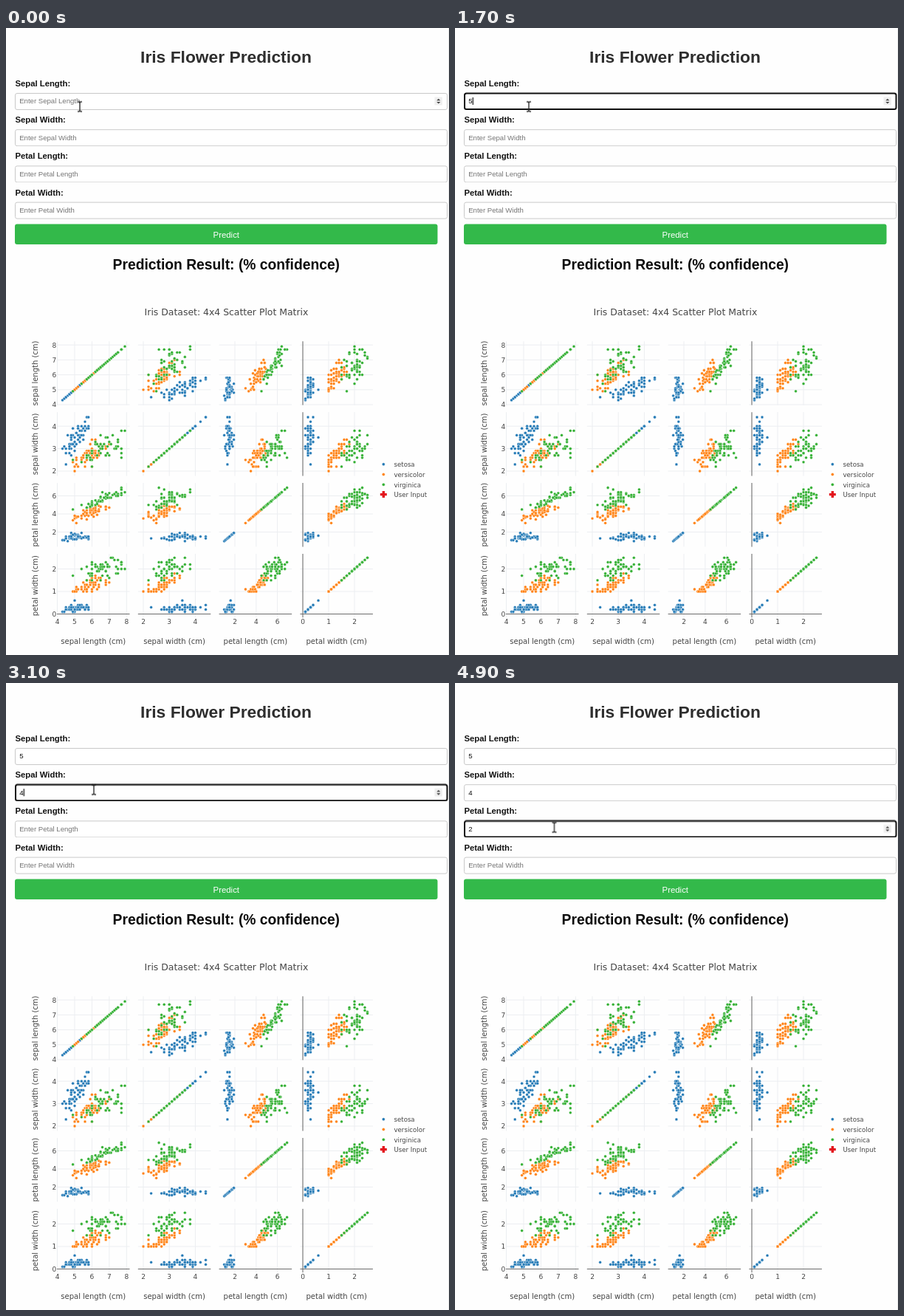
An HTML page that plays this animation: 600 by 849 pixels, repeating every 5000 ms.

```html
<!DOCTYPE html>
<html lang="en">
<head>
<meta charset="utf-8">
<title>Iris Flower Prediction</title>
<style>
html, body { margin: 0; width: 100%; height: 100%; overflow: hidden; background: #fefefe; }
svg { display: block; width: 600px; height: 849px; }
text { font-family: "Liberation Sans", Arial, sans-serif; }
.label, .head { font-weight: bold; }
.label { font-size: 11.3px; fill: #111; }
.hint { font-size: 9.6px; fill: #757575; }
.value { font-size: 9.6px; fill: #111; }
.plot text { font-family: "DejaVu Sans", Verdana, sans-serif; fill: #444; }
.tick { font-size: 9px; }
.axis { font-size: 10px; }
.legend { font-size: 8.6px; }
.mid { text-anchor: middle; }
.end { text-anchor: end; }
.grid { stroke: #eceef1; }
.zero { stroke: #6c6c6c; stroke-width: 1.1; }
.dot { stroke: #fff; stroke-width: .4; }

.anim { animation: 5s step-end infinite; }
.focus, .spin, .caret, .value { opacity: 0; }
.focus0 { animation-name: focus0; } .focus1 { animation-name: focus1; } .focus2 { animation-name: focus2; }
.spin0 { animation-name: spin0; } .spin1 { animation-name: spin1; } .spin2 { animation-name: spin2; }
.value0 { animation-name: value0; } .value1 { animation-name: value1; } .value2 { animation-name: value2; }
.hint0 { animation-name: hint0; } .hint1 { animation-name: hint1; } .hint2 { animation-name: hint2; }
.caret0 { animation-name: caret0; } .caret1 { animation-name: caret1; } .caret2 { animation-name: caret2; }
.mouse { animation-name: mouse; }

@keyframes focus0 { 0% { opacity: 0 } 10% { opacity: 1 } 52%, to { opacity: 0 } }
@keyframes focus1 { 0% { opacity: 0 } 52% { opacity: 1 } 76%, to { opacity: 0 } }
@keyframes focus2 { 0% { opacity: 0 } 76%, to { opacity: 1 } }
@keyframes spin0 { 0% { opacity: 1 } 52%, to { opacity: 0 } }
@keyframes spin1 { 0% { opacity: 0 } 42% { opacity: 1 } 76%, to { opacity: 0 } }
@keyframes spin2 { 0% { opacity: 0 } 70%, to { opacity: 1 } }
@keyframes value0 { 0% { opacity: 0 } 28%, to { opacity: 1 } }
@keyframes value1 { 0% { opacity: 0 } 60%, to { opacity: 1 } }
@keyframes value2 { 0% { opacity: 0 } 88%, to { opacity: 1 } }
@keyframes hint0 { 0% { opacity: 1 } 28%, to { opacity: 0 } }
@keyframes hint1 { 0% { opacity: 1 } 60%, to { opacity: 0 } }
@keyframes hint2 { 0% { opacity: 1 } 88%, to { opacity: 0 } }
@keyframes caret0 {
  0% { opacity: 0; transform: none } 10% { opacity: 1; transform: none } 20% { opacity: 0; transform: none }
  28% { opacity: 1; transform: translateX(5.5px) } 38% { opacity: 0; transform: translateX(5.5px) }
  48% { opacity: 1; transform: translateX(5.5px) } 52%, to { opacity: 0; transform: none }
}
@keyframes caret1 {
  0% { opacity: 0; transform: none } 52% { opacity: 1; transform: none }
  60% { opacity: 1; transform: translateX(5.5px) } 70%, to { opacity: 0; transform: none }
}
@keyframes caret2 {
  0% { opacity: 0; transform: none } 76% { opacity: 1; transform: none } 86% { opacity: 0; transform: none }
  88% { opacity: 1; transform: translateX(5.5px) } 98%, to { opacity: 0; transform: none }
}
@keyframes mouse {
  0% { transform: translate(100px, 106.5px) }
  38% { transform: translate(105px, 116px) }
  40% { transform: translate(112px, 129px) }
  42% { transform: translate(117px, 140px) }
  44% { transform: translate(119px, 144.5px) }
  66% { transform: translate(123px, 158px) }
  68% { transform: translate(129px, 177px) }
  70% { transform: translate(133px, 190px) }
  72%, to { transform: translate(134.5px, 195.5px) }
}
</style>
</head>
<body>
<svg viewBox="0 0 600 849">
  <path d="M599.5 0V849" stroke="#eee"/>
  <text class="head mid" x="298" y="47" font-size="22.8" fill="#2e2e2e">Iris Flower Prediction</text>
  <g id="form"></g>
  <rect x="12" y="265.5" width="572.5" height="27.5" rx="3" fill="#33b94a"/>
  <text class="mid" x="298.3" y="283.5" font-size="11.4" fill="#fff">Predict</text>
  <text class="head mid" x="298.3" y="327" font-size="19.3" fill="#0c0c0c">Prediction Result: (% confidence)</text>
  <g class="plot">
    <text class="mid" x="298.5" y="389" font-size="12.43">Iris Dataset: 4x4 Scatter Plot Matrix</text>
    <g id="plot"></g>
  </g>
  <g class="anim mouse" fill="none">
    <path d="M-3-6.5H-1L0-5.5L1-6.5H3M0-5.5V5.5M-3 6.5H-1L0 5.5L1 6.5H3" stroke="#222" stroke-width="1.3"/>
  </g>
</svg>
<script>
(() => {
  const NS = 'http://www.w3.org/2000/svg';
  const form = document.getElementById('form');
  const plot = document.getElementById('plot');

  function add(parent, tag, attrs, text) {
    const el = document.createElementNS(NS, tag);
    for (const k in attrs) el.setAttribute(k, attrs[k]);
    if (text !== undefined) el.textContent = text;
    parent.appendChild(el);
    return el;
  }

  // Form fields
  const values = ['5', '4', '2'];
  ['Sepal Length', 'Sepal Width', 'Petal Length', 'Petal Width'].forEach((name, i) => {
    const g = add(form, 'g', { transform: `translate(0 ${(i * 49.2).toFixed(1)})` });
    add(g, 'text', { class: 'label', x: 12.5, y: 79 }, name + ':');
    add(g, 'rect', { x: 12.5, y: 88.5, width: 585, height: 22, rx: 2.5, fill: '#fff', stroke: '#c9c9c9' });
    add(g, 'text', { class: `hint anim hint${i}`, x: 18.2, y: 102.4 }, 'Enter ' + name);
    if (i >= values.length) return;
    add(g, 'rect', { class: `focus anim focus${i}`, x: 13, y: 88.5, width: 584.5, height: 21.5, rx: 2.5,
      fill: 'none', stroke: '#101010', 'stroke-width': 2 });
    add(g, 'text', { class: `value anim value${i}`, x: 18.2, y: 102.4 }, values[i]);
    add(g, 'path', { class: `caret anim caret${i}`, d: 'M18.8 94V104', stroke: '#000', 'stroke-width': 1.2 });
    const spin = add(g, 'g', { class: `spin anim spin${i}` });
    add(spin, 'rect', { x: 580.5, y: 93.5, width: 10.5, height: 11, fill: '#efefef' });
    add(spin, 'path', { d: 'M583.2 98.3L585.8 95.8L588.4 98.3ZM583.2 100.1L585.8 102.6L588.4 100.1Z', fill: '#444' });
  });

  // Each axis maps a value in cm to pixels
  const axes = [
    { name: 'sepal length (cm)', ticks: [4, 5, 6, 7, 8], x: v => 69.5 + 23.45 * (v - 4), y: v => 510 - 20.2 * (v - 4) },
    { name: 'sepal width (cm)', ticks: [2, 3, 4], x: v => 186 + 35.2 * (v - 2), y: v => 600 - 30.4 * (v - 2) },
    { name: 'petal length (cm)', ticks: [2, 4, 6], x: v => 310 + 14.4 * (v - 2), y: v => 682.5 - 12.25 * (v - 2) },
    { name: 'petal width (cm)', ticks: [0, 1, 2], x: v => 402 + 35 * v, y: v => 793.5 - 30.5 * v }
  ];
  const colLeft = i => 69 + 109.8 * i;
  const rowTop = i => 424.3 + 95.9 * i;
  const W = 98.5, H = 86.3;

  // Mean, deviation and pairwise correlation of each species, plus its outlying flowers
  const species = [
    { name: 'setosa', color: '#1f77b4',
      mean: [5.006, 3.428, 1.462, .246], dev: [.352, .379, .174, .105],
      corr: [.743, .267, .278, .178, .233, .332],
      edge: [[5.7, 4.4, 1.5, .4], [4.3, 3, 1.1, .1], [4.5, 2.3, 1.3, .3], [5.8, 4, 1.2, .2],
        [5, 3.5, 1.6, .6], [4.8, 3.4, 1.9, .2], [4.6, 3.6, 1, .2]] },
    { name: 'versicolor', color: '#ff7f0e',
      mean: [5.936, 2.77, 4.26, 1.326], dev: [.516, .314, .47, .198],
      corr: [.526, .754, .546, .561, .664, .787],
      edge: [[5, 2, 3.5, 1], [4.9, 2.4, 3.3, 1], [7, 3.2, 4.7, 1.4], [5.1, 2.5, 3, 1.1],
        [6, 2.2, 4, 1], [5.9, 3.2, 4.8, 1.8], [6, 3.4, 4.5, 1.6], [6, 2.7, 5.1, 1.6]] },
    { name: 'virginica', color: '#2fae2f',
      mean: [6.588, 2.974, 5.552, 2.026], dev: [.636, .322, .552, .275],
      corr: [.457, .864, .281, .401, .538, .322],
      edge: [[7.9, 3.8, 6.4, 2], [7.7, 3.8, 6.7, 2.2], [4.9, 2.5, 4.5, 1.7], [7.7, 2.6, 6.9, 2.3],
        [7.2, 3.6, 6.1, 2.5], [6, 2.2, 5, 1.5], [7.7, 2.8, 6.7, 2], [7.7, 3, 6.1, 2.3]] }
  ];

  let seed = 20;
  function random() {
    seed = (seed * 1664525 + 1013904223) % 4294967296;
    return (seed + .5) / 4294967296;
  }
  const gauss = () => Math.sqrt(-2 * Math.log(random())) * Math.cos(2 * Math.PI * random());

  function cholesky(corr) {
    const r = (j, i) => i === j ? 1 : corr[j ? i + j : i - 1];
    const L = [[], [], [], []];
    for (let i = 0; i < 4; i++) {
      for (let j = 0; j <= i; j++) {
        let s = r(j, i);
        for (let k = 0; k < j; k++) s -= L[i][k] * L[j][k];
        L[i][j] = i === j ? Math.sqrt(s) : s / L[j][j];
      }
    }
    return L;
  }

  function flowers({ mean, dev, corr, edge }) {
    const L = cholesky(corr);
    const list = [...edge];
    const inside = (v, i) => {
      const col = edge.map(e => e[i]);
      return v >= Math.min(...col) && v <= Math.max(...col);
    };
    while (list.length < 50) {
      const z = mean.map(gauss);
      const f = mean.map((m, i) => {
        const c = L[i].reduce((sum, l, k) => sum + l * z[k], 0);
        return Math.round((m + dev[i] * c) * 10) / 10;
      });
      if (f.every(inside)) list.push(f);
    }
    return list;
  }

  // Panels: grid, zero lines, dots
  const data = species.map(flowers);
  axes.forEach((ay, row) => axes.forEach((ax, col) => {
    const x0 = colLeft(col), y0 = rowTop(row);
    const across = (y, c) => add(plot, 'path', { class: c, d: `M${x0} ${y}h${W}` });
    const down = (x, c) => add(plot, 'path', { class: c, d: `M${x} ${y0}v${H}` });
    ax.ticks.forEach(v => v && down(ax.x(v), 'grid'));
    ay.ticks.forEach(v => v && across(ay.y(v), 'grid'));
    if (col === 3) down(ax.x(0), 'zero');
    if (row === 3) across(ay.y(0), 'zero');
    data.forEach((list, s) => list.forEach(f => add(plot, 'circle', {
      class: 'dot', r: 1.9, fill: species[s].color,
      cx: ax.x(f[col]).toFixed(1), cy: ay.y(f[row]).toFixed(1)
    })));
  }));

  axes.forEach((a, i) => {
    a.ticks.forEach(v => {
      add(plot, 'text', { class: 'tick end', x: 68.3, y: a.y(v) + 3.3 }, v);
      add(plot, 'text', { class: 'tick mid', x: a.x(v), y: 807 }, v);
    });
    add(plot, 'text', { class: 'axis mid', x: colLeft(i) + W / 2, y: 834 }, a.name);
    add(plot, 'text', { class: 'axis mid', transform: `translate(42.5 ${rowTop(i) + H / 2}) rotate(-90)` }, a.name);
  });

  // Legend
  [...species, { name: 'User Input' }].forEach((s, i) => {
    const y = 590.7 + 13.8 * i;
    if (s.color) add(plot, 'circle', { class: 'dot', cx: 511.3, cy: y, r: 2, fill: s.color });
    else add(plot, 'path', { d: `M511.3 ${y - 5}v9M506.8 ${y - .5}h9`, stroke: '#e3141c', 'stroke-width': 3.4 });
    add(plot, 'text', { class: 'legend', x: 525.5, y: y + 3.2 }, s.name);
  });
})();
</script>
</body>
</html>
```
